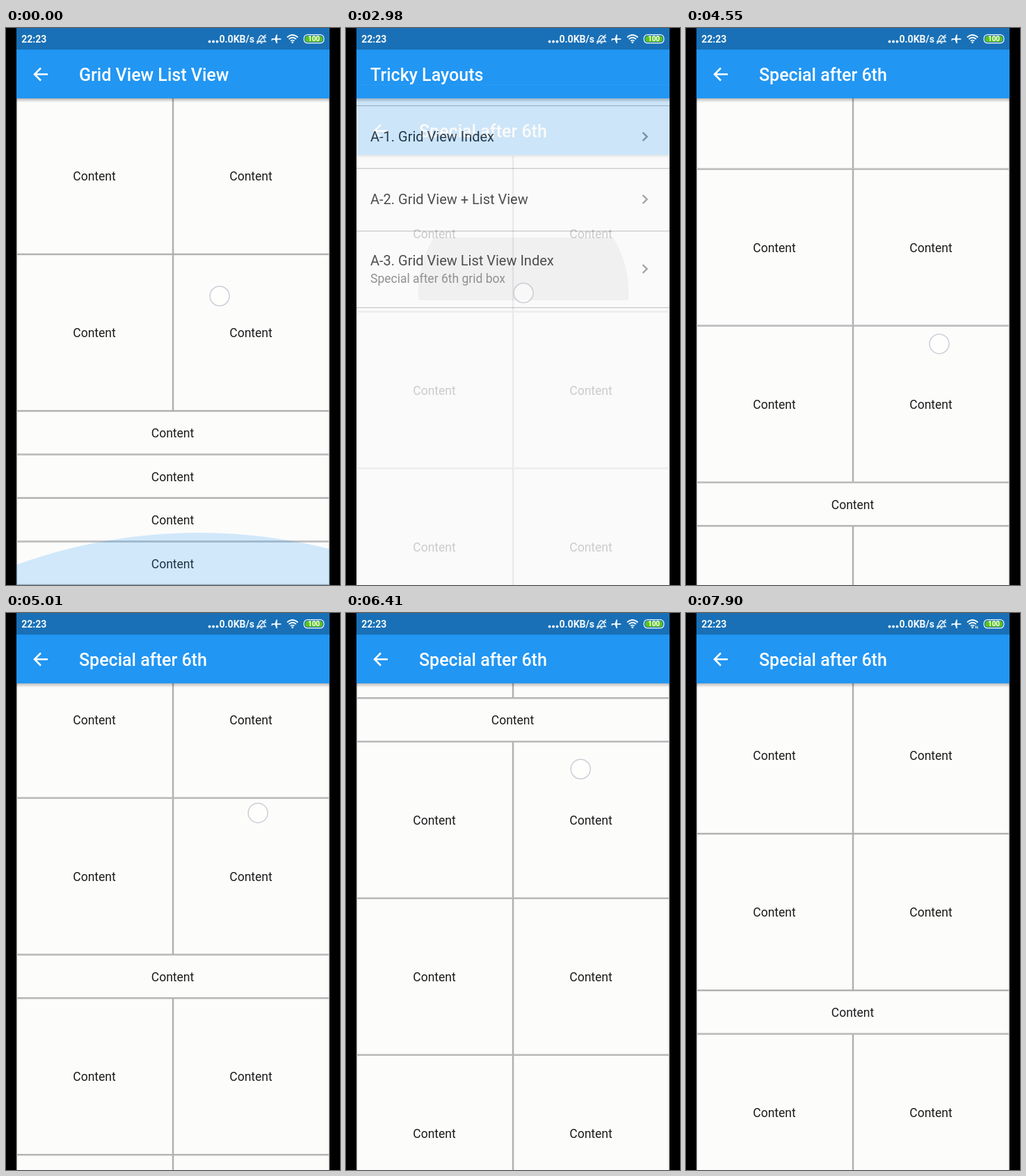
Animation, 480 px wide and 800 px high, one loop 8 s. Source, as an HTML page:

```html
<!DOCTYPE html>
<html lang="en">
<head>
<meta charset="utf-8">
<title>Tricky Layouts</title>
<style>
html, body { margin: 0; width: 100%; height: 100%; overflow: hidden; background: #000; }
svg { display: block; width: 480px; height: 800px; }
text { font-family: Roboto, sans-serif; }
.title { font-size: 25px; font-weight: 500; fill: #fff; }
.item { font-size: 20px; fill: #212121; }
.sub { font-size: 17.5px; fill: #757575; }
.cell rect { fill: none; stroke: #b0b0b0; stroke-width: 1.25; }
.cell text { font-size: 17.5px; fill: #1c1c1c; text-anchor: middle; }
.status { font-size: 14px; font-weight: 600; fill: #f4fafc; }
.rule { stroke: #bcbcc2; stroke-width: 1.25; }
</style>
</head>
<body>
<svg viewBox="0 0 480 800">
  <defs>
    <clipPath id="screen"><rect x="15" width="450" height="800"/></clipPath>
    <clipPath id="tile"><rect x="15" y="301" width="450" height="90"/></clipPath>
    <linearGradient id="shade" x2="0" y2="1">
      <stop stop-color="#000" stop-opacity=".26"/>
      <stop offset="1" stop-color="#000" stop-opacity="0"/>
    </linearGradient>
    <g id="bar">
      <rect x="15" y="101" width="450" height="6" fill="url(#shade)"/>
      <rect x="15" width="450" height="101" fill="#2196f3"/>
    </g>
    <path id="arrow" d="M60 66.500H41.500M50 57.500L41 66.500L50 75.500" fill="none" stroke="#fff" stroke-width="2.500"/>
  </defs>
  <rect width="480" height="800"/>
  <g clip-path="url(#screen)">
    <g id="menu">
      <rect x="15" width="450" height="800" fill="#fafafa"/>
      <circle id="ripple" cx="255" cy="380" clip-path="url(#tile)" fill="#505058"/>
      <use href="#bar"/>
      <text class="title" x="35" y="76">Tricky Layouts</text>
    </g>
    <g id="page">
      <rect x="15" width="450" height="800" fill="#fcfcfb"/>
      <g id="mixed" class="cell"></g>
      <g id="special" class="cell"></g>
      <ellipse id="glow" cx="277" rx="770" ry="770" fill="#2196f3"/>
      <use href="#bar"/>
      <circle id="press" cx="50" cy="66" fill="#fff"/>
      <use href="#arrow"/>
      <text id="title" class="title" x="105" y="76"></text>
    </g>
    <g id="status">
      <rect x="15" width="450" height="31" fill="#1970b6"/>
      <text class="status" x="22.300" y="21">22:23</text>
      <g fill="#f4fafc">
        <circle cx="292.500" cy="19.500" r="1.900"/><circle cx="298" cy="19.500" r="1.900"/><circle cx="303.500" cy="19.500" r="1.900"/>
      </g>
      <text class="status" x="306.500" y="21">0.0KB/s</text>
      <g fill="none" stroke="#f4fafc" stroke-width="1.300">
        <path d="M361 19.500C364 17 363 11 367 11S370 17 373 19.500ZM365.500 21.500H368.500M360.500 22.500L373.500 9.500M371 13.500H374"/>
        <path d="M404 13.500Q411.500 6.500 419.500 13.500M406.500 16Q411.500 11.500 417 16M409 18.500Q411.500 16.500 414.500 18.500" stroke-width="1.700"/>
      </g>
      <circle cx="411.700" cy="20.700" r="1.400" fill="#f4fafc"/>
      <path d="M381.500 14.900H386.500L388.500 9.500H390L389.600 14.900H394.500Q397 15.800 394.500 16.700H389.600L390 22H388.500L386.500 16.700H383.500L382.300 18.300H381.300L381.800 15.800Z" fill="#f4fafc"/>
      <path id="traffic" d="M416.500 22V18.500M418.800 19V22.500" stroke="#f4fafc" stroke-width="1.200"/>
      <rect x="428.200" y="9.700" width="28.600" height="12" rx="5" fill="#1970b6" stroke="#f4fafc" stroke-width="1.200"/>
      <rect x="430" y="11.500" width="25" height="8.400" rx="3.500" fill="#58c41c"/>
      <text x="442.500" y="19.300" font-size="10" font-weight="700" fill="#fff" text-anchor="middle">100</text>
    </g>
    <circle id="touch" r="14" fill="#fff" fill-opacity=".5" stroke="#c4c4d0" stroke-opacity=".85" stroke-width="1.500"/>
  </g>
</svg>
<script>
const $ = id => document.getElementById(id);
const set = (el, attrs) => { for (const k in attrs) el.setAttribute(k, attrs[k]); };
const clamp = (v, a = 0, b = 1) => Math.min(b, Math.max(a, v));
const mix = (a, b, p) => a + (b - a) * p;

function add(parent, tag, attrs, text) {
  const el = document.createElementNS('http://www.w3.org/2000/svg', tag);
  set(el, attrs);
  if (text) el.textContent = text;
  parent.appendChild(el);
}

// Layout
const CELL = 225, ROW = 62.5, TOP = 101;

function box(parent, x, y, w, h) {
  add(parent, 'rect', { x: x + 0.6, y: y + 0.6, width: w - 1.2, height: h - 1.2 });
  add(parent, 'text', { x: x + w / 2 - 0.5, y: y + h / 2 + 6.8 }, 'Content');
}

function gridRows(parent, y, count) {
  for (let i = 0; i < count; i++, y += CELL) {
    box(parent, 15, y, CELL, CELL);
    box(parent, 240, y, CELL, CELL);
  }
  return y;
}

let end = gridRows($('mixed'), TOP - 1, 2);
for (let i = 0; i < 4; i++) box($('mixed'), 15, end + i * ROW, 450, ROW);

end = TOP;
for (let i = 0; i < 3; i++) {
  end = gridRows($('special'), end, 3);
  box($('special'), 15, end, 450, ROW);
  end += ROW;
}

for (const y of [111, 201, 291, 401])
  add($('menu'), 'line', { class: 'rule', x1: 15, x2: 465, y1: y + 0.5, y2: y + 0.5 });
[['A-1. Grid View Index', 163, 156], ['A-2. Grid View + List View', 253, 246],
 ['A-3. Grid View List View Index', 341, 346]].forEach(([label, y, mid]) => {
  add($('menu'), 'text', { class: 'item', x: 35, y }, label);
  add($('menu'), 'path', { d: `M426.5 ${mid - 6}l6 6l-6 6`, fill: 'none', stroke: '#8c8c8c', 'stroke-width': 2.4 });
});
add($('menu'), 'text', { class: 'sub', x: 35, y: 366 }, 'Special after 6th grid box');

// Motion
function bezier(x1, y1, x2, y2) {
  const at = (a, b, s) => 3 * s * (1 - s) * (a * (1 - s) + b * s) + s ** 3;
  return x => {
    let lo = 0, hi = 1;
    for (let i = 0; i < 22; i++) {
      const s = (lo + hi) / 2;
      if (at(x1, x2, s) < x) lo = s; else hi = s;
    }
    return at(y1, y2, (lo + hi) / 2);
  };
}
const slide = bezier(0.4, 0, 0.2, 1);
const fade = bezier(0.42, 0, 1, 1);

// Smooth curve through [time, value] points
function curve(points) {
  const last = points.length - 1;
  const slope = i => i <= 0 || i >= last ? 0 :
    (points[i + 1][1] - points[i - 1][1]) / (points[i + 1][0] - points[i - 1][0]);
  return t => {
    if (t <= points[0][0]) return points[0][1];
    if (t >= points[last][0]) return points[last][1];
    const i = points.findIndex(p => p[0] > t) - 1;
    const [t0, v0] = points[i], [t1, v1] = points[i + 1];
    const d = t1 - t0, p = (t - t0) / d, q = 1 - p;
    return v0 * (1 + 2 * p) * q * q + v1 * p * p * (3 - 2 * p) +
      d * p * q * (slope(i) * q - slope(i + 1) * p);
  };
}
const scroll = curve([[4060, 0], [4400, 75], [5010, 285], [5200, 345], [5640, 420],
  [6410, 653.5], [6560, 696], [6900, 745], [7480, 925], [7900, 971.5]]);

// start, end, x from, x to, y for a scroll position
const touches = [
  [0, 40, 307, 307, () => 385],
  [790, 880, 51, 51, () => 68],
  [2690, 3020, 255, 255, () => 380.5],
  [4060, 5160, 366, 361.5, s => 580.5 - s * 1.028],
  [5640, 6480, 345, 336.5, s => 878 - s],
  [6900, 7480, 352, 346, s => 1215 - s],
];

function draw(t) {
  const first = t < 1500;
  const shown = first ? 1 - clamp((t - 881) / 300) : clamp((t - 2864) / 300);
  const s = scroll(t);
  set($('page'), {
    transform: `translate(0 ${200 * (1 - slide(shown))})`,
    opacity: fade(shown),
    display: shown > 0 ? 'inline' : 'none',
  });
  set($('mixed'), { display: first ? 'inline' : 'none' });
  set($('special'), { display: first ? 'none' : 'inline', transform: `translate(0 ${-s})` });
  $('title').textContent = first ? 'Grid View List View' : 'Special after 6th';

  const glow = 1 - clamp((t - 30) / 510);
  set($('glow'), { cy: 1570 - 75 * glow ** 1.5, 'fill-opacity': first ? 0.2 * glow : 0 });

  const press = clamp((t - 790) / 160);
  set($('press'), { r: 42 * press, 'fill-opacity': first ? 0.2 * (1 - clamp((t - 900) / 200)) : 0 });

  const grow = Math.max(0, t - 2860);
  set($('ripple'), { r: grow * 1.25, 'fill-opacity': 0.07 * (1 - clamp((t - 2990) / 200)) });

  const touch = touches.find(([a, b]) => t >= a && t < b);
  set($('touch'), { display: touch ? 'inline' : 'none' });
  if (touch) {
    const [a, b, x0, x1, y] = touch;
    set($('touch'), { cx: mix(x0, x1, (t - a) / (b - a)), cy: y(s) });
  }
  set($('traffic'), { display: t >= 7890 ? 'inline' : 'none' });
}

const start = performance.now();
function tick() {
  draw((performance.now() - start) % 8000);
  requestAnimationFrame(tick);
}
tick();
</script>
</body>
</html>
```
